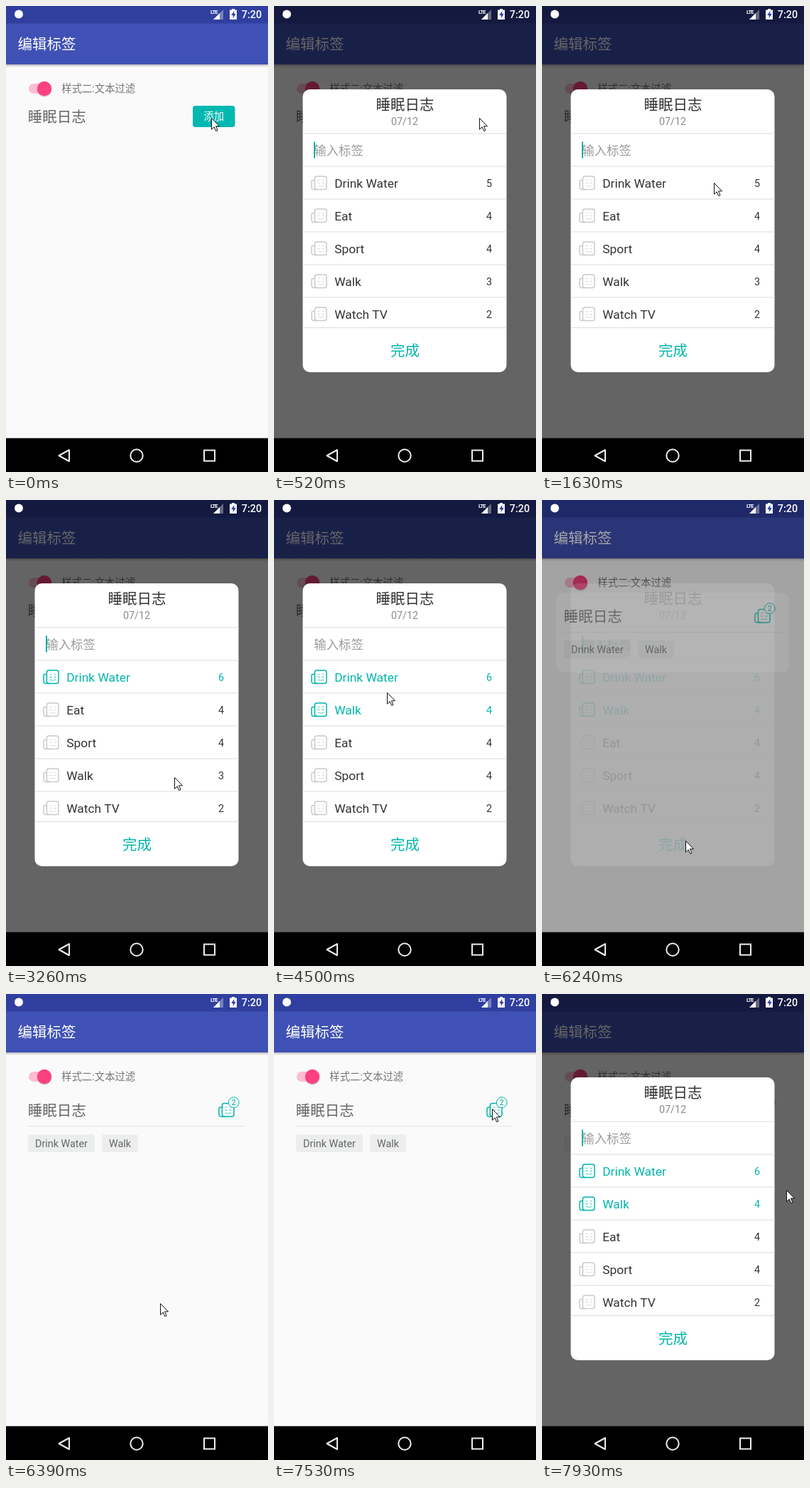
An HTML page for the animation above (8000 ms loop, 369 by 654 pixels).

```html
<!DOCTYPE html>
<html lang="zh-CN">
<head>
<meta charset="utf-8">
<title>编辑标签</title>
<style>
  html, body { margin: 0; width: 100%; height: 100%; overflow: hidden; background: #fafafa; }
  svg { display: block; font-family: Roboto, "Noto Sans CJK SC", "Noto Sans CJK", sans-serif; }
  .s { font-size: 14.35px; }
  .m { font-size: 17.4px; }
  .l { font-size: 20.5px; }
  .mid { text-anchor: middle; }
  .teal { color: #00b5ab; }
  .line { stroke: #dcdcdc; }
</style>
</head>
<body>
<svg width="369" height="654" viewBox="0 0 369 654">
  <defs>
    <linearGradient id="shade" x2="0" y2="1">
      <stop stop-opacity=".3"/><stop offset="1" stop-opacity="0"/>
    </linearGradient>
    <symbol id="note" width="24" height="22" overflow="visible">
      <g fill="none" stroke="currentColor" stroke-linecap="round">
        <g stroke-width="1.5">
          <rect x="5.4" y="1" width="16.6" height="18.6" rx="3"/>
          <path d="M5.4 6.6H3a2 2 0 0 0-2 2v8a3 3 0 0 0 3 3h5"/>
        </g>
        <path d="M10 6.5h2M16 6.5h2M9.5 10.5h3M15.5 10.5h3M10 14.5q4 1.4 8 0" stroke-width=".9" opacity=".75"/>
      </g>
    </symbol>
  </defs>

  <g id="page">
    <rect width="369" height="654" fill="#fafafa"/>
    <rect y="81" width="369" height="5" fill="url(#shade)"/>
    <rect width="369" height="82" fill="#3f51b5"/>
    <rect width="369" height="24.5" fill="#303f9f"/>
    <text class="l" x="16.4" y="60.6" fill="#fff">编辑标签</text>
    <rect x="32" y="109" width="31" height="14" rx="7" fill="#fdbcd1"/>
    <circle cx="54" cy="117.3" r="10.3" opacity=".2"/>
    <circle cx="54" cy="116" r="10.2" fill="#fb417f"/>
    <text class="s" x="78.3" y="121.4" fill="#757575">样式二:文本过滤</text>

    <g id="empty">
      <text class="l" x="30.7" y="162.7" fill="#666">睡眠日志</text>
      <rect x="263" y="140" width="59.5" height="30" rx="4" fill="#00b8b0"/>
      <text class="s mid" x="292.8" y="160.4" fill="#fff">添加</text>
    </g>

    <g id="filled">
      <text class="l" x="30.7" y="170.5" fill="#666">睡眠日志</text>
      <use href="#note" class="teal" x="299" y="152.5"/>
      <circle cx="320.8" cy="152.2" r="7.4" fill="#fafafa" stroke="#00b5ab"/>
      <text class="mid" x="320.8" y="156" font-size="10.5" fill="#00a59c">2</text>
      <path d="M31 185.5H337" stroke="#e6e6e6"/>
      <rect x="31" y="197" width="94" height="25" rx="4" fill="#eceeed"/>
      <rect x="135" y="197" width="51" height="25" rx="4" fill="#eceeed"/>
      <g class="s mid" fill="#666">
        <text x="78" y="214.7">Drink Water</text>
        <text x="160.5" y="214.7">Walk</text>
      </g>
    </g>
  </g>

  <rect id="dim" width="369" height="607"/>
  <rect id="card" x="20" y="130" width="328" height="112" rx="10" fill="#fff" opacity=".08"/>

  <g id="dialog">
    <rect x="40.5" y="117" width="287" height="397" rx="10" fill="#fff"/>
    <text class="l mid" x="184.5" y="145.8" fill="#333">睡眠日志</text>
    <text class="s mid" x="184" y="167.2" fill="#8a8a8a">07/12</text>
    <path class="line" d="M40.5 179H327.5"/>
    <text class="m" x="56.3" y="209" fill="#9c9c9c">输入标签</text>
    <rect id="caret" x="56" y="190.5" width="2" height="23" fill="#00b0a6"/>
    <g id="rows"></g>
    <path class="line" d="M40.5 451.5H327.5"/>
    <text class="l mid" x="184.5" y="490.8" fill="#00b5ab">完成</text>
  </g>

  <g id="status" fill="#fff">
    <circle cx="18" cy="11.5" r="6"/>
    <text x="288" y="11" font-size="7.5" font-weight="700" letter-spacing="-.8">LTE</text>
    <path d="M306 5V19H292Z" opacity=".35"/>
    <path d="M301 10V19H292Z"/>
    <path d="M318 4h4v1.5h3V19h-10V5.500h3Z"/>
    <path d="M321.300 7l-4 6h2.400v4l4-6h-2.400Z" fill="#303f9f"/>
    <text class="s" x="331.800" y="17.400" font-weight="500">7:20</text>
  </g>

  <rect y="606.500" width="369" height="48"/>
  <g fill="none" stroke="#eee" stroke-width="2">
    <path d="M74.500 631L89 623V639Z" stroke-linejoin="round"/>
    <circle cx="184" cy="631" r="8.700"/>
    <rect x="279" y="623.500" width="15" height="15"/>
  </g>

  <path id="pointer" d="M.5 .5V16.200L4.200 12.800L6.700 18.500L9 17.500L6.500 11.800H11.500Z" fill="#fff" stroke="#111"/>
</svg>

<script>
const LOOP = 8000;
const $ = id => document.getElementById(id);

// [name, count, time picked]
const items = [
  ['Drink Water', 5, 2060],
  ['Eat', 4, Infinity],
  ['Sport', 4, Infinity],
  ['Walk', 3, 4100],
  ['Watch TV', 2, Infinity]
];

// [time, dim opacity, dialog opacity]
const fades = [
  [0, 0, 0], [400, .3, .5], [520, .6, 1], [6240, .35, .12],
  [6390, 0, 0], [7780, .3, .5], [7930, .6, 1]
];

// [first step, last step, step count, x, y]
const moves = [
  [820, 1630, 7, 242, 248],
  [2194, 2860, 6, 240, 314],
  [3260, 3260, 1, 237, 389],
  [3390, 3650, 3, 236, 392],
  [4230, 4500, 3, 159, 270],
  [4620, 4980, 4, 160, 284],
  [5100, 5807, 6, 224, 440],
  [5949, 6090, 2, 202, 478],
  [6390, 7230, 7, 304, 168],
  [7380, 7380, 1, 307, 161],
  [7930, 7930, 1, 344, 275]
];

const caretToggles = [1020, 1495, 2060, 2460, 3390, 3650, 4230, 4740, 5240, 5807];

const last = (table, t) => table.filter(row => row[0] <= t).pop();

function pointerAt(t) {
  let x = 289, y = 157;
  for (const [start, end, count, toX, toY] of moves) {
    if (t < start) break;
    const gap = (end - start) / (count - 1) || 1;
    const part = Math.min(count, Math.floor((t - start) / gap + 1e-6) + 1) / count;
    x += (toX - x) * part;
    y += (toY - y) * part;
  }
  return [x, y];
}

function rowMarkup([name, count, picked], i, t) {
  const on = t >= picked;
  const top = 225 + i * 46;
  const ink = on ? '#00b5ab' : '#333';
  return `<path class="line" d="M40.5 ${top}H327.5"/>
    <use href="#note" x="52" y="${top + 13}" color="${on ? ink : '#cacaca'}"/>
    <text class="m" x="85.2" y="${top + 30}" fill="${ink}">${name}</text>
    <text class="s mid" x="303" y="${top + 29}" fill="${ink}">${count + on}</text>`;
}

let shownPicks = -1;
function drawRows(t) {
  const picks = items.filter(item => t >= item[2]).length;
  if (picks === shownPicks) return;
  shownPicks = picks;
  const sorted = [...items].sort((a, b) => (t >= b[2]) - (t >= a[2]));
  $('rows').innerHTML = sorted.map((item, i) => rowMarkup(item, i, t)).join('');
}

const show = (id, on) => $(id).setAttribute('visibility', on ? 'visible' : 'hidden');

function draw(t) {
  const [, dim, dialog] = last(fades, t);
  const saved = t >= 6240;
  $('dim').setAttribute('opacity', dim);
  $('dialog').setAttribute('opacity', dialog);
  show('empty', !saved);
  show('filled', saved);
  show('card', saved && t < 6390);
  show('caret', caretToggles.filter(at => at <= t).length % 2 === 0);
  drawRows(t);
  $('pointer').setAttribute('transform', `translate(${pointerAt(t).map(Math.round)})`);
}

const begin = performance.now();
function tick() {
  draw((performance.now() - begin) % LOOP);
  requestAnimationFrame(tick);
}
tick();
</script>
</body>
</html>
```
